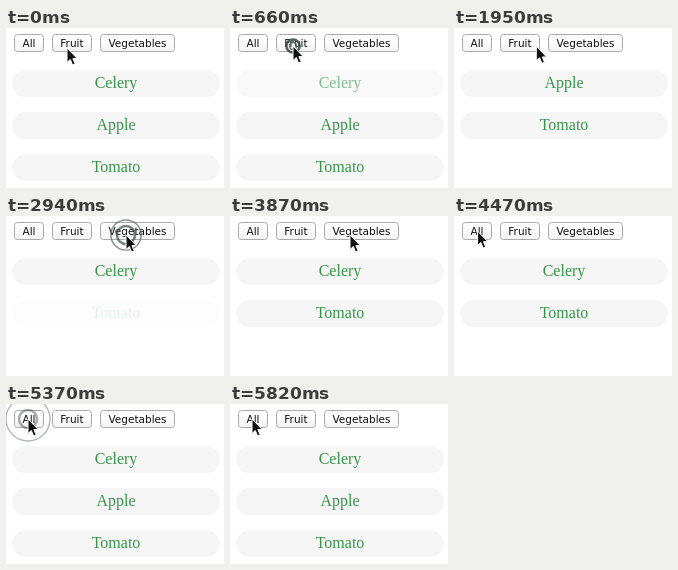
Animation, 218 px wide and 160 px high, one loop 5880 ms. Source, as an HTML page:

```html
<!DOCTYPE html>
<html lang="en">
<head>
<meta charset="utf-8">
<title>Filtered list</title>
<style>
  html, body { margin: 0; width: 100%; height: 100%; overflow: hidden; background: #fff; }
  svg { display: block; width: 218px; height: 160px; }
  text { text-anchor: middle; }
  .button rect { fill: url(#face); stroke: #aaa; }
  .button text { font: 10.5px "DejaVu Sans", sans-serif; fill: #111; }
  .item rect { fill: #f6f6f6; }
  .item text { font: 16px "Liberation Serif", serif; fill: #36964a; }
  .ring { fill: none; }
</style>
</head>
<body>
<svg viewBox="0 0 218 160">
  <defs>
    <linearGradient id="face" x2="0" y2="1">
      <stop stop-color="#fff"/>
      <stop offset="1" stop-color="#f5f5f5"/>
    </linearGradient>
  </defs>
  <g id="buttons"></g>
  <g id="items"></g>
  <circle id="outer" class="ring" stroke="#52665b" stroke-width="1.5"/>
  <circle id="inner" class="ring" stroke="#33483e" stroke-width="2.5"/>
  <path id="cursor" d="M0 0V14.5L3.3 11.5L5.6 17L8.2 15.9L5.9 10.6H10.3Z"
        fill="#111" stroke="#fff" stroke-width="1" stroke-linejoin="round"/>
</svg>
<script>
const LOOP = 5880, FADE = 240;
const $ = id => document.getElementById(id);

const BUTTONS = [["All", 8, 30], ["Fruit", 46, 40], ["Vegetables", 94, 75]];
$("buttons").innerHTML = BUTTONS.map(([label, x, w]) =>
  `<g class="button"><rect x="${x + .5}" y="6.5" width="${w - 1}" height="17" rx="3"/>
   <text x="${x + w / 2}" y="19">${label}</text></g>`).join("");

const NAMES = ["Celery", "Apple", "Tomato"];
$("items").innerHTML = NAMES.map(name =>
  `<g class="item"><rect x="6" y="42" width="208" height="27" rx="13.5"/>
   <text x="110" y="60">${name}</text></g>`).join("");
const items = [...$("items").children];

// Start time, then row and fade direction for each item (null = absent)
const STAY = 0, IN = 1, OUT = -1;
const SCENES = [
  [0,    [0, STAY], [1, STAY], [2, STAY]],
  [570,  [0, OUT],  [1, STAY], [2, STAY]],
  [810,  null,      [0, STAY], [1, STAY]],
  [2640, [0, IN],   [1, OUT],  [2, OUT]],
  [2910, [0, STAY], null,      [1, IN]],
  [4980, [0, STAY], [1, IN],   [2, STAY]]
];

// Cursor moves: start, end, from, to
const MOVES = [
  [0, 150, [61, 20], [63, 18]],
  [1740, 2280, [63, 18], [120, 19]],
  [4110, 4500, [120, 19], [22, 15]]
];
const CLICKS = [540, 2640, 4860];

const clamp = x => Math.max(0, Math.min(1, x));
const smooth = x => (x = clamp(x)) * x * (3 - 2 * x);
const latest = (list, t, start) => list.filter(e => start(e) <= t).pop();

function set(el, attrs) {
  for (const key in attrs) el.setAttribute(key, attrs[key]);
}

function drawItems(t) {
  const [start, ...states] = latest(SCENES, t, s => s[0]);
  const k = clamp((t - start) / FADE);
  states.forEach((state, i) => {
    const [row, fade] = state || [0, STAY];
    const opacity = !state ? 0 : fade === IN ? k : fade === OUT ? 1 - k : 1;
    set(items[i], { transform: `translate(0 ${row * 42})`, opacity });
  });
}

function drawPointer(t) {
  const [start, end, from, to] = latest(MOVES, t, m => m[0]);
  const k = smooth((t - start) / (end - start));
  const [x, y] = from.map((a, i) => a + (to[i] - a) * k);
  set($("cursor"), { transform: `translate(${x} ${y})` });

  const click = latest(CLICKS, t, c => c);
  const age = click === undefined ? LOOP : t - click;
  set($("outer"), {
    cx: x, cy: y, r: 22 * smooth(age / 480),
    opacity: .9 * clamp(1 - (age - 150) / 700)
  });
  set($("inner"), {
    cx: x, cy: y, r: Math.min(9, 5 + age / 75),
    opacity: .85 * clamp(1 - (age - 150) / 750)
  });
}

function frame(now) {
  const t = now % LOOP;
  drawItems(t);
  drawPointer(t);
  requestAnimationFrame(frame);
}
frame(0);
</script>
</body>
</html>
```
